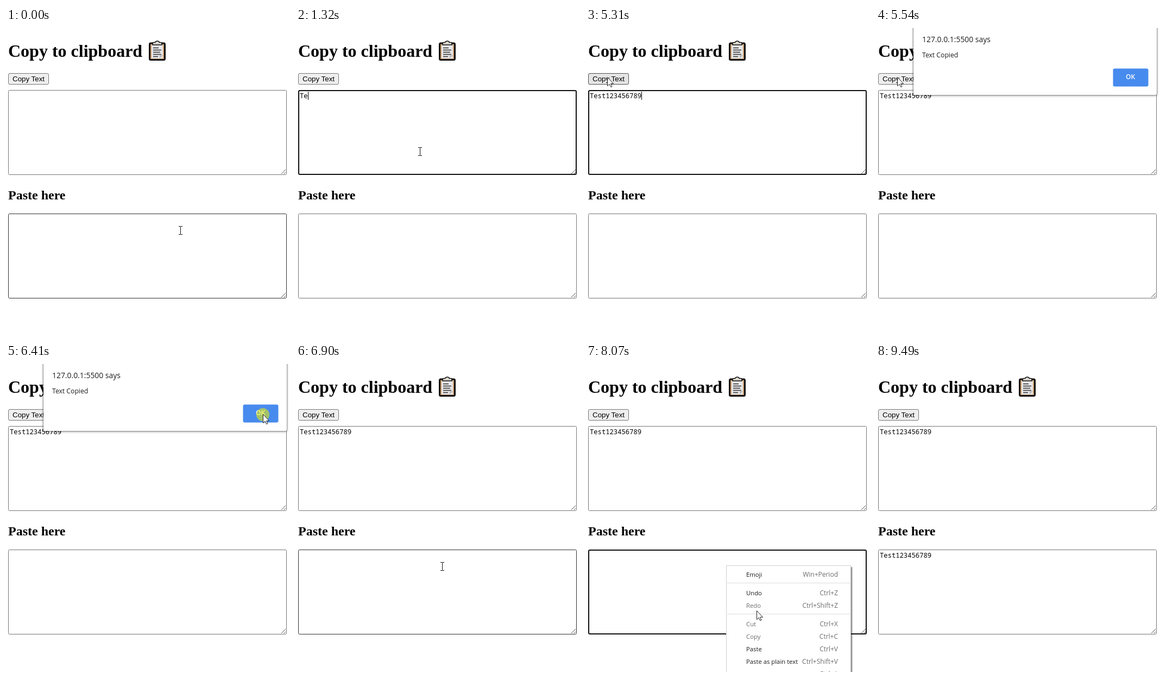
Write an HTML page that moves like this. It is 523 by 566 pixels and loops after 9.57 s.

```html
<!DOCTYPE html>
<html lang="en">
<head>
<meta charset="utf-8">
<title>Copy to clipboard</title>
<style>
  html, body { margin: 0; width: 100%; height: 100%; overflow: hidden; background: #fff; }
  svg { display: block; }
  text { white-space: pre; }
  .serif { font-family: "Liberation Serif", serif; font-weight: bold; }
  .button { font: 13.333px "Liberation Sans", sans-serif; }
  .mono { font: 12.2px "Noto Sans Mono", monospace; }
  .ui { font-family: "Open Sans", sans-serif; fill: #1c1c1c; }
  .ok { font-weight: 600; fill: #fff; }
  .outline { fill: none; stroke: #767676; }
  .hover { stroke: #333; }
  .focus { stroke: #101010; stroke-width: 2; }
  .off { fill: #6d6d6d; }
  #dialog { filter: drop-shadow(0 0 1px #000a) drop-shadow(0 1px 2px #0006); }
  #panel { filter: drop-shadow(2px 3px 1px #0008); }
</style>
</head>
<body>
<svg width="523" height="566" viewBox="0 0 523 566">
  <text class="serif" x="4" y="53" font-size="32">Copy to clipboard</text>
  <g id="clipboard">
    <rect x="264.5" y="28" width="28" height="30.500" rx="2" fill="#cfa070" stroke="#111" stroke-width="3"/>
    <path d="M268 31h21v25h-21z" fill="#e6e6e8"/>
    <path d="M283 56v-6h6z" fill="#b9bbbd"/>
    <path d="M270 31v-3q0-1.500 2-1.500h2.500q1-2.500 4-2.500t4 2.500h2.500q2 0 2 1.500v3z" fill="#d9d6cf" stroke="#111" stroke-width="1.600"/>
    <path d="M271 36.500h10M271 40.500h15M271 44.500h13M271 48.500h15M271 52.500h9" stroke="#333" stroke-width="1.600"/>
  </g>

  <rect id="button" x="4.500" y="83.500" width="74" height="20" rx="2.500"/>
  <text class="button" x="12" y="98">Copy Text</text>
  <text class="serif" x="4" y="315" font-size="24">Paste here</text>
  <g id="areas"></g>

  <g id="dialog">
    <path d="M69-5V121q0 2 2 2H515q2 0 2-2V-5z" fill="#fff"/>
    <text class="ui" x="85" y="26" font-size="13.900">127.0.0.1:5500 says</text>
    <text class="ui" x="85" y="54" font-size="12.200">Text Copied</text>
    <rect x="436.500" y="74.500" width="65" height="33" rx="3" fill="#478bee"/>
    <text class="ui ok" x="468.500" y="94" font-size="12" text-anchor="middle">OK</text>
  </g>

  <g id="menu">
    <rect id="panel" x="258.500" y="370.500" width="229" height="220" fill="#fff" stroke="#d0d0d0"/>
    <rect id="highlight" x="260" width="226" height="23" fill="#e8e8e9"/>
    <path d="M260 402.500h226M260 459.500h226" stroke="#dcdcdc"/>
  </g>

  <circle id="press" r="12" fill="rgb(240 240 0 / .55)"/>
  <path id="arrow" d="M.500.500V16.500L4.200 13.200 6.700 18.500 9 17.500 6.600 12.300H11.500z" fill="#fff" stroke="#222"/>
  <path id="beam" d="M-3.500-7.500h3l.500.500.500-.500h3M0-7V7M-3.500 7.500h3l.500-.500.500.500h3" fill="none" stroke="#111"/>
</svg>
<script>
const LOOP = 9570, BLINK = 500, KEY_GAP = 170, PRESS = 90;
const $ = id => document.getElementById(id);
const show = (el, on) => el.setAttribute("visibility", on ? "visible" : "hidden");
const move = (id, x, y) => $(id).setAttribute("transform", `translate(${x} ${y})`);
const within = (value, from, to) => value >= from && value < to;
const clamp = (value, low, high) => Math.min(high, Math.max(low, value));

// Where the pointer goes, when it gets there and how long it travels
const start = { arrive: 0, travel: 1, x: 321, y: 372 };
const copyArea = { arrive: 210, travel: 160, x: 228, y: 227 };
const copyButton = { arrive: 5300, travel: 600, x: 39, y: 90 };
const okButton = { arrive: 6310, travel: 480, x: 473, y: 92 };
const pasteArea = { arrive: 6900, travel: 410, x: 269, y: 372 };
const menuMiddle = { arrive: 8070, travel: 470, x: 314, y: 453 };
const pasteItem = { arrive: 8510, travel: 400, x: 321, y: 524 };
const exit = { arrive: 9390, travel: 300, x: 328, y: 575 };
const stops = [start, copyArea, copyButton, okButton, pasteArea, menuMiddle, pasteItem, exit];
const clicked = [copyArea, copyButton, okButton, pasteArea, pasteItem];

const pressed = stop => stop.arrive + PRESS;
const released = stop => pressed(stop) + PRESS;
const menuOpens = 7600, blurs = 9490;

const bursts = [["Test", 1150], ["123", 2417], ["456", 3120], ["789", 3760]];
const message = bursts.map(([text]) => text).join("");

function pointerAt(t) {
  let { x, y } = start;
  for (const stop of stops) {
    const p = clamp((t - stop.arrive) / stop.travel + 1, 0, 1), ease = p * p * (3 - 2 * p);
    x += (stop.x - x) * ease;
    y += (stop.y - y) * ease;
  }
  return [Math.round(x), Math.round(y)];
}

function typingAt(t) {
  let text = "", lastKey = pressed(copyArea);
  for (const [part, begin] of bursts) {
    const count = clamp(Math.floor((t - begin) / KEY_GAP) + 1, 0, part.length);
    text += part.slice(0, count);
    if (count) lastKey = begin + (count - 1) * KEY_GAP;
  }
  return [text, lastKey];
}

// The caret stays on after each action, then blinks
const caretOn = (t, since) => (t - since) % (2 * BLINK) < BLINK;

function makeArea(top) {
  $("areas").insertAdjacentHTML("beforeend", `<g>
    <path d="M507 ${top + 154}l8-8m-3 8l3-3" stroke="#555"/>
    <rect class="outline"/><text class="mono" x="7" y="${top + 15}"></text>
    <path stroke="#000" d="M.5 ${top + 3}v15"/></g>`);
  const [, frame, text, caret] = $("areas").lastElementChild.children;
  return (value, focused, caretShown, hovered) => {
    const inset = focused ? 1 : .5;
    const box = { x: 4 + inset, y: top + inset, width: 513 - 2 * inset, height: 156 - 2 * inset, rx: 2 };
    for (const key in box) frame.setAttribute(key, box[key]);
    frame.setAttribute("class", "outline" + (focused ? " focus" : hovered ? " hover" : ""));
    text.textContent = value;
    caret.setAttribute("transform", `translate(${Math.round(7 + value.length * 7.32)})`);
    show(caret, focused && caretShown);
  };
}
const drawCopyArea = makeArea(114), drawPasteArea = makeArea(341);

// Label, shortcut, separators above, enabled
const items = [
  ["Emoji", "Win+Period", 0, true], ["Undo", "Ctrl+Z", 1, true], ["Redo", "Ctrl+Shift+Z", 1, false],
  ["Cut", "Ctrl+X", 2, false], ["Copy", "Ctrl+C", 2, false], ["Paste", "Ctrl+V", 2, true],
  ["Paste as plain text", "Ctrl+Shift+V", 2, true], ["Select all", "Ctrl+A", 2, true]
].map(([label, keys, separators, enabled], i) =>
  ({ label, keys, enabled, top: 375.5 + 23 * i + 11 * separators }));
for (const { label, keys, enabled, top } of items)
  $("menu").insertAdjacentHTML("beforeend",
    `<text class="ui ${enabled ? "" : "off"}" x="295" y="${top + 15.5}" font-size="11.300">${label}</text>
     <text class="ui off" x="464" y="${top + 15.5}" font-size="12" text-anchor="end">${keys}</text>`);

function draw(t) {
  const [x, y] = pointerAt(t);
  const dialog = within(t, released(copyButton), released(okButton));
  const menu = within(t, menuOpens, released(pasteItem));
  const free = !dialog && !menu;
  const inCopy = free && within(y, 114, 270), inPaste = free && within(y, 341, 497);
  const onButton = free && within(x, 4, 79) && within(y, 83, 104);

  const [typed, lastKey] = typingAt(t);
  drawCopyArea(typed, within(t, pressed(copyArea), pressed(copyButton)), caretOn(t, lastKey), inCopy);
  const pasted = t >= released(pasteItem);
  const lastAction = pasted ? released(pasteItem) : pressed(pasteArea);
  drawPasteArea(pasted ? message : "", within(t, pressed(pasteArea), blurs),
    !menu && caretOn(t, lastAction), inPaste);

  $("button").setAttribute("fill", onButton ? "#e5e5e5" : "#efefef");
  $("button").setAttribute("stroke", onButton ? "#4f4f4f" : "#767676");

  show($("dialog"), dialog);
  show($("menu"), menu);
  const row = menu && items.find(({ top, enabled }) => enabled && within(y, top, top + 23));
  show($("highlight"), row);
  if (row) $("highlight").setAttribute("y", row.top);

  const beam = inCopy || inPaste;
  show($("beam"), beam);
  show($("arrow"), !beam);
  show($("press"), clicked.some(stop => within(t, pressed(stop), released(stop))));
  move("arrow", x, y);
  move("beam", x + .5, y);
  move("press", x, y + 1);
}

function tick() {
  draw(performance.now() % LOOP);
  requestAnimationFrame(tick);
}
tick();
</script>
</body>
</html>
```
